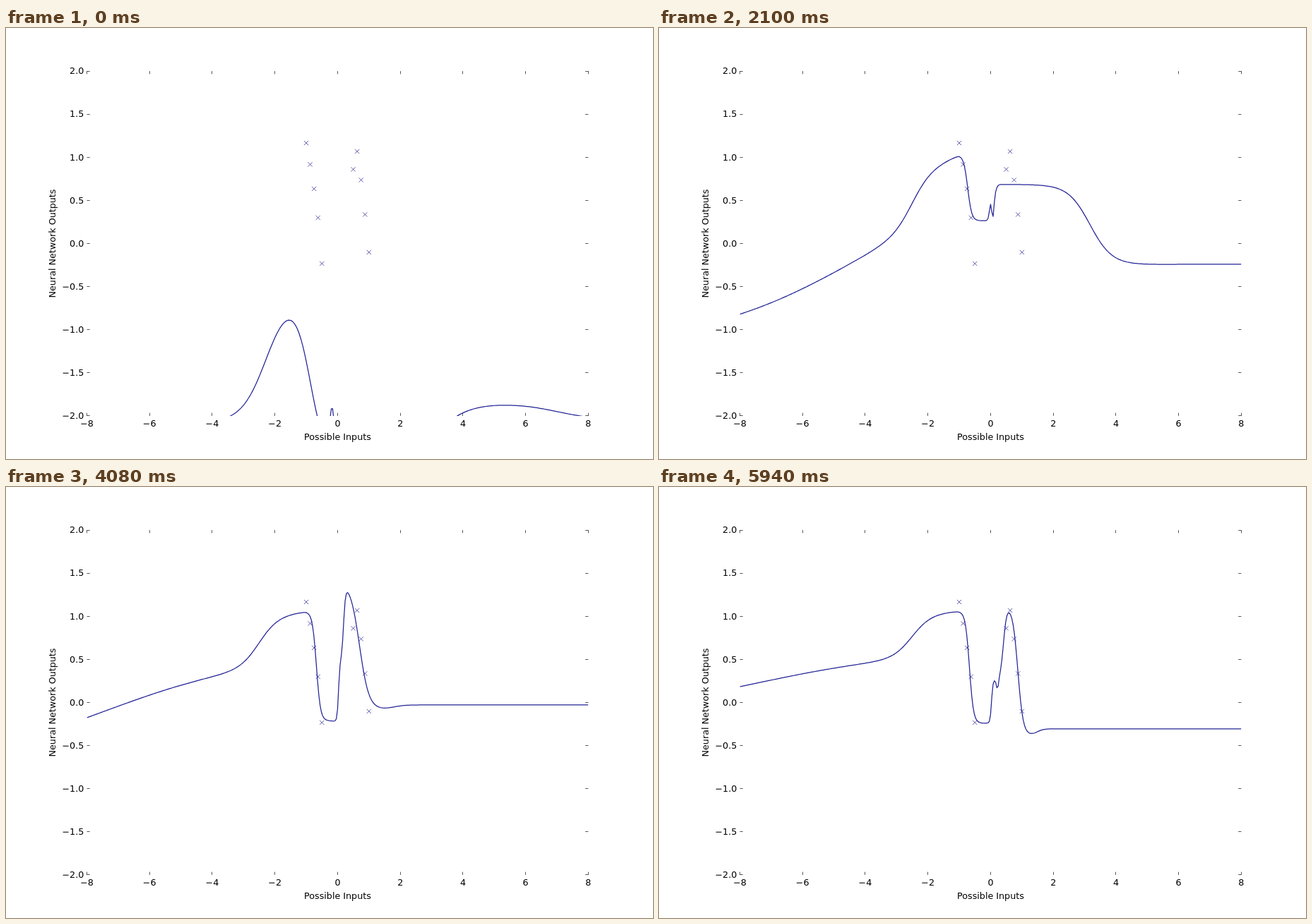
An HTML page with a canvas that plays this animation: 916 by 611 pixels, repeating every 6 s.

```html
<!DOCTYPE html>
<html lang="en">
<head>
<meta charset="utf-8">
<title>Network fit</title>
<style>
  html, body { margin: 0; width: 100%; height: 100%; overflow: hidden; background: #fff; }
  canvas { display: block; }
</style>
</head>
<body>
<canvas id="stage" width="916" height="611"></canvas>
<script>
const ctx = document.getElementById('stage').getContext('2d');
const LOOP = 6000, STEP = 60;
const LEFT = 114.5, RIGHT = 824.4, TOP = 61.1, BOTTOM = 549.9;
const px = x => LEFT + (x + 8) / 16 * (RIGHT - LEFT);
const py = y => BOTTOM - (y + 2) / 4 * (BOTTOM - TOP);

const SAMPLES = [
  [-1, 1.166], [-.875, .917], [-.75, .635], [-.625, .299], [-.5, -.233],
  [.5, .86], [.625, 1.068], [.75, .737], [.875, .336], [1, -.102],
];

const sigmoid = u => (1 + Math.tanh(u)) / 2;
const step = (x, centre, width) => sigmoid((x - centre) / width);

// The network output is a chain of soft steps between levels:
// start > foot > plateau > valley > ledge > peak > trough > tail.
// Names ending in X are step centres, names ending in W are step widths.
function output(x, p) {
  const slope = v => step(v, p.slopeX, 5);
  const climb = (slope(Math.min(x, -1)) - slope(-8)) / (slope(-1) - slope(-8));
  const peakW = 0.03 + 0.18 * Math.max(p.peakX, 0);
  const notchX = (p.ledgeX + p.peakX) / 2;
  return p.start + (p.foot - p.start) * climb
    + (p.plateau - p.foot) * step(x, p.riseX, p.riseW)
    + (p.valley - p.plateau) * step(x, p.dropX, p.dropW)
    + (p.ledge - p.valley) * step(x, p.ledgeX, 0.045)
    + (p.peak - p.ledge) * step(x, p.peakX, peakW)
    + (p.trough - p.peak) * step(x, p.fallX, p.fallW)
    + (p.tail - p.trough) * step(x, p.fallX + 3.6 * p.fallW, 1.2 * p.fallW)
    - p.notch * Math.exp(-(((x - notchX) / 0.05) ** 2));
}

// Each pose keeps whatever it does not change.
const poses = [];
const pose = (time, changes) => poses.push({ ...poses.at(-1), time, ...changes });

pose(0, {
  start: -2.08, foot: -2.08, plateau: -.53, valley: -2.55,
  ledge: -2, peak: -2.6, trough: -1.85, tail: -2.05, notch: 0,
  slopeX: -3, riseX: -2.25, riseW: .8, dropX: -.88, dropW: .5,
  ledgeX: -.26, peakX: -.1, fallX: 3.05, fallW: 1.1,
});
pose(1020, {
  start: -1.408, foot: -.968, plateau: .65, valley: .2,
  ledge: .33, peak: .775, trough: .14, tail: .14,
  riseX: -1.83, riseW: .55, dropX: -.47, dropW: .2,
  ledgeX: -.03, peakX: .16, fallX: 5, fallW: 1.2,
});
pose(2100, {
  start: -.82, foot: .386, plateau: 1.025, valley: .265,
  ledge: .55, peak: .685, trough: -.245, tail: -.24, notch: .25,
  slopeX: -4.2, riseX: -2.5, riseW: .62, dropX: -.73, dropW: .13,
  peakX: .17, fallX: 3.17, fallW: .7,
});
pose(3240, {
  start: -.528, foot: .494, plateau: 1.01, valley: -.15,
  ledge: .33, peak: .86, trough: -.42, tail: -.31, notch: 0,
  slopeX: -6, dropX: -.675, ledgeX: 0, fallX: 1.15, fallW: .85,
});
pose(4080, {
  start: -.176, foot: .467, plateau: 1.055, valley: -.21,
  ledge: .5, peak: 1.4, trough: -.08, tail: -.028,
  slopeX: -7.5, ledgeX: .03, peakX: .19, fallX: .7, fallW: .3,
});
pose(5220, {
  start: .102, foot: .535, plateau: 1.035, valley: -.275,
  ledge: .25, peak: 1.05, trough: -.45, tail: -.352,
  peakX: .34, fallX: .89, fallW: .2,
});
pose(5940, {
  start: .184, foot: .55, plateau: 1.06, valley: -.24,
  ledge: .26, peak: 1.12, trough: -.38, tail: -.305, notch: .12,
  peakX: .41, fallX: .87, fallW: .17,
});

function poseAt(time) {
  let i = 0;
  while (i < poses.length - 2 && time >= poses[i + 1].time) i++;
  const a = poses[i], b = poses[i + 1], mixed = {};
  let t = (time - a.time) / (b.time - a.time);
  if (i === 0) t = 1 - (1 - t) ** 3; // training moves fastest at the start
  for (const key in a) mixed[key] = a[key] + (b[key] - a[key]) * t;
  return mixed;
}

function drawCurve(p) {
  ctx.save();
  ctx.beginPath();
  ctx.rect(LEFT, TOP, RIGHT - LEFT, BOTTOM - TOP);
  ctx.clip();
  ctx.beginPath();
  for (let i = 0; i <= 400; i++) {
    const x = -8 + i * 0.04;
    ctx.lineTo(px(x), py(output(x, p)));
  }
  ctx.strokeStyle = '#232396';
  ctx.lineWidth = 1.25;
  ctx.lineJoin = 'round';
  ctx.stroke();
  ctx.restore();
}

function line(x0, y0, x1, y1) {
  ctx.moveTo(x0, y0);
  ctx.lineTo(x1, y1);
}

const label = (value, digits) => value.toFixed(digits).replace('-', '\u2212');

function drawAxes() {
  const tick = 4.24;
  ctx.fillStyle = '#000';
  ctx.strokeStyle = '#222';
  ctx.lineWidth = 0.75;
  ctx.font = '12.72px "DejaVu Sans", sans-serif';
  ctx.beginPath();
  ctx.textAlign = 'center';
  for (let v = -8; v <= 8; v += 2) {
    const x = Math.floor(px(v)) + 0.5;
    line(x, TOP, x, TOP + tick);
    line(x, BOTTOM, x, BOTTOM - tick);
    ctx.fillText(label(v, 0), px(v), 565);
  }
  ctx.textAlign = 'right';
  for (let v = -2; v <= 2; v += 0.5) {
    const y = Math.floor(py(v)) + 0.5;
    line(LEFT, y, LEFT + tick, y);
    line(RIGHT, y, RIGHT - tick, y);
    ctx.fillText(label(v, 1), LEFT - tick, Math.round(py(v) + 4.2));
  }
  ctx.stroke();

  ctx.textAlign = 'center';
  ctx.fillText('Possible Inputs', (LEFT + RIGHT) / 2, 584);
  ctx.save();
  ctx.translate(70, (TOP + BOTTOM) / 2);
  ctx.rotate(-Math.PI / 2);
  ctx.fillText('Neural Network Outputs', 0, 0);
  ctx.restore();
}

function drawSamples() {
  const r = 3.1;
  ctx.beginPath();
  for (const [sx, sy] of SAMPLES) {
    const x = px(sx), y = py(sy);
    line(x - r, y - r, x + r, y + r);
    line(x - r, y + r, x + r, y - r);
  }
  ctx.strokeStyle = '#2a2a90';
  ctx.lineWidth = 0.75;
  ctx.stroke();
}

function draw(time) {
  ctx.fillStyle = '#fff';
  ctx.fillRect(0, 0, 916, 611);
  drawCurve(poseAt(time));
  drawSamples();
  drawAxes();
}

let start;
function frame(now) {
  start ??= now;
  draw(Math.floor(((now - start) % LOOP) / STEP) * STEP);
  requestAnimationFrame(frame);
}
draw(0);
requestAnimationFrame(frame);
</script>
</body>
</html>
```
